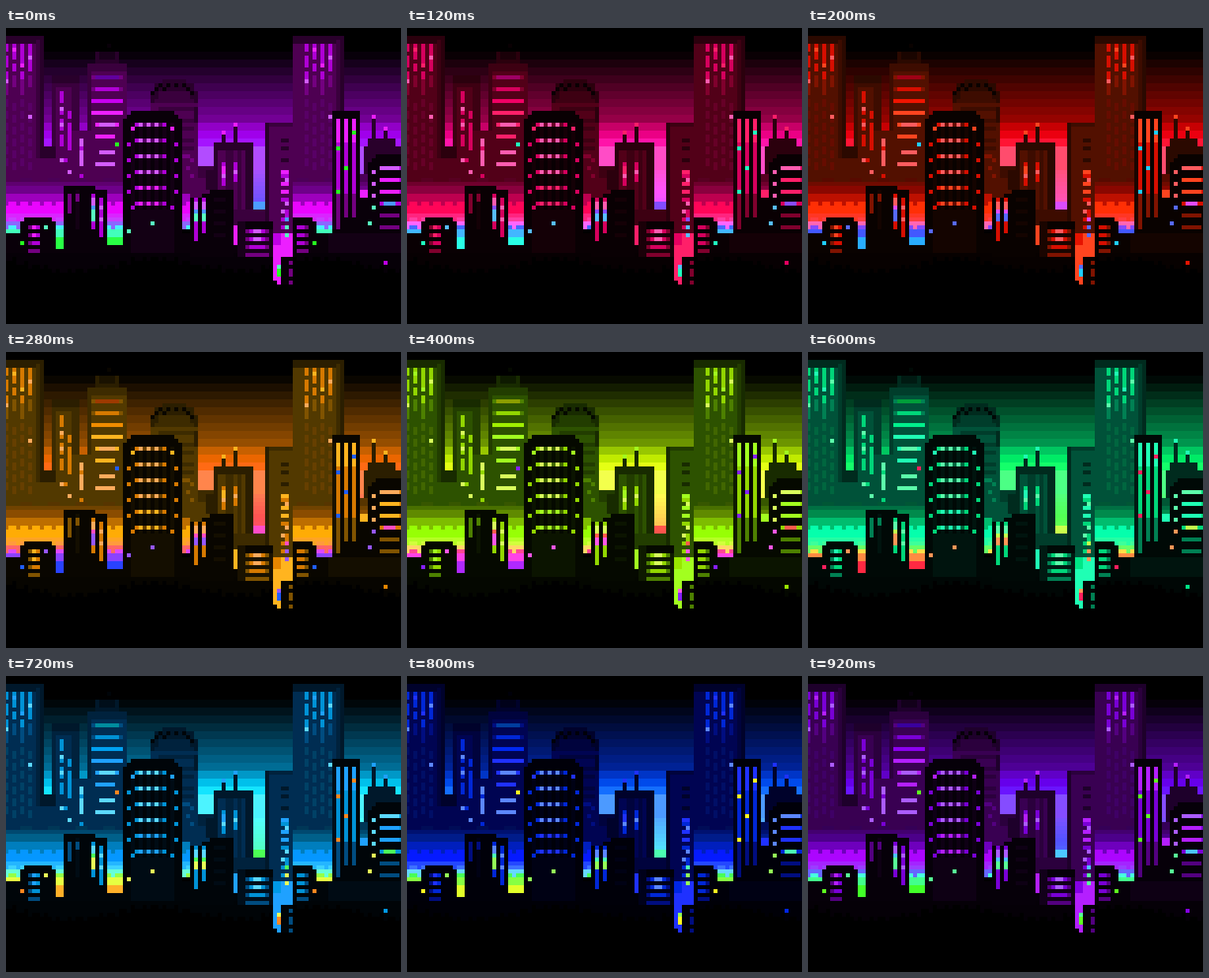
Animation of 500 by 375 pixels, one loop 960 ms. Source, as an HTML page with a canvas:

```html
<!DOCTYPE html>
<html lang="en">
<head>
<meta charset="utf-8">
<title>Neon skyline</title>
<style>
html, body { margin: 0; width: 100%; height: 100%; overflow: hidden; background: #000; }
canvas { display: block; }
</style>
</head>
<body>
<canvas id="stage" width="500" height="375"></canvas>
<script>
const ctx = document.getElementById('stage').getContext('2d');
const STEP = 40, STEPS = 24;
let turn = 0;

// Colours are [hue, lightness]; all hues turn together.
const wall = [297, 16], shade = [297, 12], edge = [297, 8.5], dark = [297, 5], ink = [297, 1.8], seam = [297, 4];
const dusk = [292, 20], faint = [294, 25], lit = [289, 42], pink = [295, 56], pale = [284, 68];
const blue = [215, 65], mint = [158, 67], green = [118, 56];

// All positions are in cells of 5 px; column 0 begins 2 px left of the stage.
function box([hue, light], x, y, w = 1, h = 1) {
  ctx.fillStyle = `hsl(${(hue + turn) % 360} 100% ${light}%)`;
  ctx.fillRect(x * 5 - 2, y * 5, w * 5, h * 5);
}
const dots = (color, ...cells) => cells.forEach(([x, y]) => box(color, x, y));
const floors = (color, x, w, ...rows) => rows.forEach(y => box(color, x, y, w));

function sky(y) {
  if (y < 6) return [290, 0];
  if (y < 24) return [290 - y / 6, 2 + Math.floor((y - 6) / 2) * 3.4];
  if (y < 26) return [284, 39];
  if (y < 28) return [281, 46];
  if (y < 30) return [277, 54];
  if (y < 36) return [274, 65];
  return y < 44 ? [274 - (y - 34) * 2.6, 66] : [213, 65];
}

const hazeStops = [[0, 292, 17], [39, 291, 22], [40, 288, 27], [42, 290, 37], [44, 295, 51],
  [47, 290, 57], [48, 284, 62], [49, 255, 70], [50, 185, 64], [51, 158, 63], [53, 128, 58]];
function haze(y) {
  const [, hue, light] = hazeStops.filter(s => s[0] <= y).pop();
  return [hue, light];
}
function glow(x, y, w, h) {
  for (let i = 0; i < h; i++) box(haze(y + i), x, y + i, w);
  for (let i = 0; i < w; i++) {
    if ((x + i) % 3 === 0) [44, 48, 50].forEach(r => r > y && r < y + h && box(haze(r - 1), x + i, r));
  }
}

function tower(x) {
  box(edge, x, 2, 13, 31);
  box(wall, x, 4, 11, 34);
  box(shade, x + 11, 3, 1, 30);
  for (let i = 0; i < 4; i++) {
    const c = x + 3 + i * 2;
    box(lit, c, 4, 1, 9 - i % 2 * 2);
    box(faint, c, 13 - i % 2 * 2, 1, 4);
    box(wall, c, 6 + i * 2 % 5);
    box(wall, c, 10 + i % 2);
    for (let y = 18; y < 36; y += 3) box(dusk, c, y + i % 2, 1, 2);
  }
  dots(pale, [x + 9, 7], [x + 3, 13], [x + 9, 22]);
  dots(pink, [x + 5, 5], [x + 7, 9]);
}

function farLeft() {
  box(edge, 12, 12, 7, 3);
  box(shade, 12, 14, 7, 24);
  box(wall, 13, 15, 4, 23);
  box(edge, 9, 30, 4, 3);
  box(wall, 17, 26, 4, 12);
  box(wall, 8, 33, 5, 5);
  box(lit, 14, 16, 1, 14);
  box(lit, 16, 21, 1, 10);
  floors(wall, 14, 1, 19, 22, 26);
  floors(wall, 16, 1, 23);
  box(pale, 19, 28, 1, 2);
  box(pale, 19, 31, 1, 4);
  box(lit, 19, 30);
  dots(pale, [14, 20], [14, 24], [14, 33], [16, 36]);
  dots(lit, [19, 37], [15, 33]);

  box(ink, 26, 4);
  box(edge, 23, 6, 6, 3);
  box(dark, 24, 6, 4, 2);
  box(shade, 21, 9, 10, 2);
  box(wall, 21, 11, 10, 27);
  box(shade, 21, 11, 1, 15);
  [[277, 31], lit, [290, 47], pink].forEach((c, i) => {
    box(faint, 22, 12 + i * 3, 8);
    box(c, 22 + (i < 2), 12 + i * 3, i < 2 ? 6 : 8);
  });
  box(pink, 23, 24, 6);
  box(pale, 24, 24, 4);
  box(pink, 23, 27, 5);
  box(pale, 24, 31, 4);
  box(pale, 23, 34, 5);
  box(green, 28, 29);
}

function dome() {
  box(edge, 40, 13, 6, 2);
  box(edge, 38, 14, 10, 2);
  box(edge, 37, 16, 12, 5);
  box(shade, 39, 16, 8, 2);
  box(wall, 37, 19, 12, 23);
  box(shade, 38, 18, 10);
  box(shade, 39, 20, 9);
  box(edge, 48, 20, 1, 4);
  dots(ink, [39, 14], [41, 14], [43, 14], [45, 14], [38, 15], [40, 15], [46, 15], [37, 16], [47, 16]);
  floors(shade, 45, 3, 23, 25, 28, 30);
  dots(faint, [45, 32], [46, 32], [47, 33], [46, 35], [47, 37]);
}

function centre() {
  box(shade, 49, 35, 4, 8);
  box(wall, 47, 38, 6, 8);
  box(edge, 51, 36, 2, 5);
  box(edge, 55, 26, 1, 3);
  box(edge, 58, 25, 1, 4);
  box(pink, 55, 26);
  box(pink, 58, 24);
  box(edge, 53, 29, 10, 17);
  box(wall, 54, 31, 7, 15);
  box(shade, 56, 31, 2, 10);
  box(shade, 59, 31, 1, 15);
  box(lit, 55, 34, 1, 6);
  box(pink, 55, 35, 1, 2);
  box(lit, 58, 34, 1, 5);
  dots(pale, [55, 37], [58, 36]);
  box(shade, 58, 46, 12, 4);

  box(edge, 66, 24, 7, 29);
  box(wall, 67, 24, 6, 34);
  box(shade, 67, 24, 6);
  floors(edge, 70, 2, 28, 30, 33);
  floors(pink, 70, 2, 36, 39, 41);
  floors(lit, 70, 2, 37, 43);
  dots(pale, [71, 38], [71, 44], [70, 46]);
  dots(blue, [71, 46], [71, 48]);
  dots(mint, [71, 50], [71, 52]);
  dots(lit, [70, 48], [70, 50]);
}

function blackTower() {
  box(ink, 32, 21, 11, 38);
  box(ink, 31, 22, 13, 36);
  box(ink, 30, 23, 15, 34);
  for (let x = 32; x < 44; x += 2) box(seam, x, 24, 1, 28);
  box(seam, 32, 46, 11, 11);
  for (let i = 0; i < 6; i++) {
    const y = 24 + i * 4, side = i % 5 ? 0 : 1;
    dots(lit, [33, y], [40, y]);
    dots(i > 3 ? pink : pale, [34, y], [36, y], [38, y]);
    dots(dusk, [35, y], [37, y], [39, y]);
    dots(i ? lit : pink, [31 + side, y + 1], [43 - side, y + 1]);
  }
  box(mint, 37, 49);
  box(mint, 31, 51);
}

function neon(x, y, h) {
  box(lit, x, y, 1, h);
  box(pale, x, y + 1, 1, 2);
  box(blue, x, y + 3);
  box(mint, x, y + 4, 1, 2);
}

function nearLeft() {
  box(ink, 15, 40, 8, 15);
  box(ink, 21, 41, 5, 14);
  box(seam, 18, 41, 1, 10);
  box(faint, 16, 42, 1, 5);
  box(faint, 18, 42, 1, 2);
  neon(22, 42, 9);
  box(mint, 22, 48);
  box(lit, 24, 43, 1, 10);
  dots(pale, [24, 45], [24, 48]);

  box(ink, 5, 48, 7, 10);
  box(ink, 4, 49, 9, 9);
  [50, 52, 54, 56].forEach((y, i) => {
    box(faint, 6, y, 3);
    box(i < 3 ? lit : faint, 7, y, 2);
    if (i < 2) box(pink, 7, y);
  });
  box(mint, 10, 50);
  box(green, 4, 54);
}

function nearMiddle() {
  box(ink, 47, 43, 5, 15);
  box(ink, 50, 42, 3, 16);
  box(ink, 52, 41, 6, 17);
  floors(seam, 53, 3, 43, 46, 49, 52);
  neon(48, 43, 11);
  neon(50, 43, 9);
  box(pink, 58, 50, 1, 5);
  box(dark, 59, 49, 9, 9);
  box(ink, 61, 49, 7, 2);
  [51, 53, 55, 57].forEach((y, i) => {
    box(faint, 61, y, 6);
    if (i < 3) box(lit, 62, y, 4);
    if (i < 2) box(pale, 63, y, 2);
  });
  box(pink, 68, 52, 5, 6);
  box([290, 45], 68, 52, 2, 3);
  box(pink, 68, 56, 2, 8);
  box(pink, 69, 64);
  box(mint, 69, 60);
  box(green, 69, 61, 1, 2);
  box(lit, 71, 46, 1, 2);
  box(mint, 71, 52);
  box(ink, 70, 58, 3, 7);
  floors(faint, 72, 1, 59, 61, 62, 64);
}

function nearRight() {
  box(ink, 73, 48, 5, 10);
  box(ink, 73, 49, 6, 9);
  [50, 52, 54, 56].forEach((y, i) => {
    box(faint, 74, y, 3);
    if (i < 3) box(lit, 74, y, 2);
  });
  box(green, 78, 54);

  box(edge, 93, 22, 1, 6);
  box(edge, 96, 26, 1, 2);
  box(pink, 93, 22);
  box(pink, 96, 25);
  box(edge, 92, 28, 7, 10);
  box(edge, 91, 30, 10, 9);
  glow(90, 37, 2, 6);
  box(pink, 90, 41, 2, 2);
  box(ink, 83, 21, 7, 36);
  box(dark, 83, 23, 1, 28);
  for (let i = 0; i < 3; i++) {
    box(lit, 84 + i * 2, 23, 1, i ? 24 : 28);
    box(pink, 84 + i * 2, 23, 1, 6);
    box(faint, 84 + i * 2, 42, 1, i ? 6 : 9);
  }
  dots(green, [88, 26], [84, 30], [86, 35], [84, 41]);

  box(ink, 94, 32, 7, 3);
  box(ink, 93, 33, 8, 25);
  box(ink, 92, 34, 9, 24);
  box(ink, 90, 43, 11, 15);
  box(seam, 82, 52, 19, 6);
  [35, 38, 41, 44, 47, 50].forEach((y, i) => {
    box(i > 3 ? faint : lit, 95, y, i > 3 ? 5 : 6);
    if (i < 3) box(i ? pink : pale, 95, y, 5);
    if (i < 4) box(i === 3 ? mint : pale, 93, y + 1);
  });
  box(blue, 96, 44, 3);
  box(mint, 92, 49);
}

function ground() {
  box([297, 0], 0, 58, 101, 17);
  for (let x = 0; x < 101; x++) {
    const depth = 60 + Math.round(1.6 * Math.cos((x - 17) * 0.15) + 0.8 * Math.sin(x * 2.3));
    box([297, 1.3], x, 57, 1, depth - 57);
  }
  box([290, 45], 96, 59);
}

function draw() {
  ctx.fillStyle = '#000';
  ctx.fillRect(0, 0, 500, 375);
  for (let y = 0; y < 46; y++) box(sky(y), 0, y, 101);
  tower(-3);
  tower(73);
  farLeft();
  dome();
  glow(0, 38, 31, 15);
  glow(45, 42, 3, 9);
  box(wall, 31, 38, 14, 5);
  glow(73, 38, 10, 14);
  for (let x = 0; x < 83; x++) {
    if ((x < 30 || x > 72) && x % 7 < 4) box(wall, x, 38);
  }
  box(ink, 0, 52, 101, 6);
  glow(13, 48, 2, 8);
  glow(26, 48, 4, 7);
  centre();
  blackTower();
  nearLeft();
  nearRight();
  ground();
  nearMiddle();
}

let shown = -1;
function tick() {
  const step = Math.floor(performance.now() / STEP) % STEPS;
  if (step !== shown) {
    shown = step;
    turn = step * 360 / STEPS;
    draw();
  }
  requestAnimationFrame(tick);
}
tick();
</script>
</body>
</html>
```
